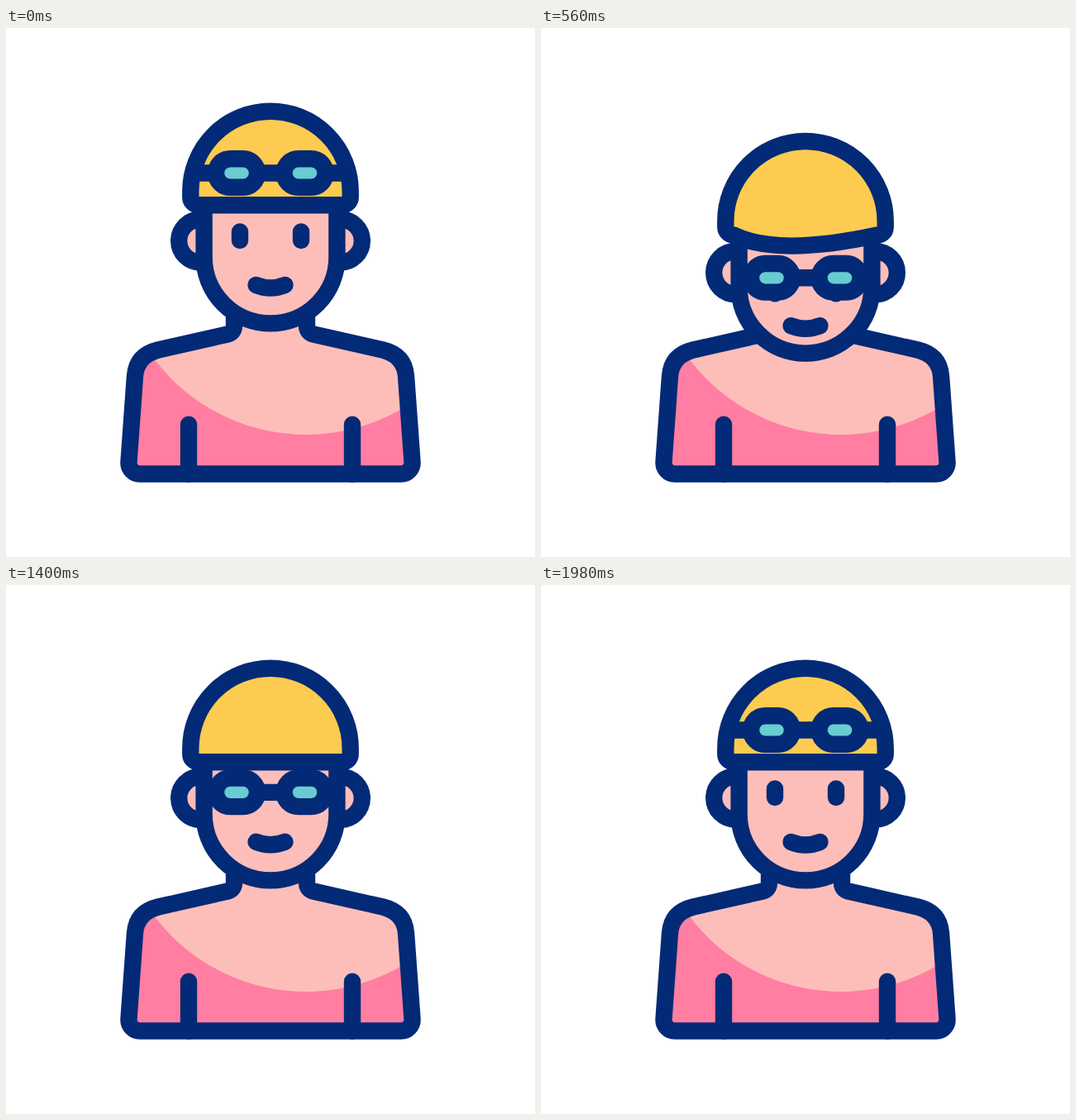
Write an HTML page that moves like this. It is 640 px wide and 640 px high and loops after 2400 ms.

```html
<!DOCTYPE html>
<html lang="en">
<head>
<meta charset="utf-8">
<title>Swimmer</title>
<style>
  html, body { margin: 0; width: 100%; height: 100%; overflow: hidden; background: #fff; }
  svg { display: block; width: 100%; height: 100%; }
  .line { stroke: #032a76; stroke-width: 20.4; stroke-linecap: round; stroke-linejoin: round; fill: none; }
  .skin { fill: #fdbeb9; }
  .shirt { fill: #ff7ea1; }
  .cap { fill: #fdcb50; }
  .lens { fill: #68ccd1; }
  .strap { stroke-linecap: butt; }
</style>
</head>
<body>
<svg viewBox="0 0 640 640">
  <defs>
    <path id="torso" d="M276 345V360Q276 368.500 268 370.500L184 389.500Q158 396 156 421L148.500 525A13.500 13.500 0 0 0 162 539.500H478A13.500 13.500 0 0 0 491.500 525L484 421Q482 396 456 389.500L372 370.500Q364 368.500 364 360V345"/>
    <clipPath id="inside"><use href="#torso"/></clipPath>
  </defs>

  <g clip-path="url(#inside)">
    <rect class="shirt" x="130" y="330" width="380" height="220"/>
    <circle class="skin" cx="363" cy="262" r="230"/>
  </g>
  <use href="#torso" class="line"/>
  <path class="line" d="M221 479.700V539.700M419 479.700V539.700"/>

  <g id="head">
    <circle id="earL" class="line skin" cx="235.200" cy="257.500" r="26"/>
    <circle id="earR" class="line skin" cx="404.800" cy="257.500" r="26"/>
    <path class="line skin" d="M239.600 206V277A80.400 80.400 0 0 0 400.400 277V206"/>
    <path id="eyes" class="line" d="M283 246.500V257M357 246.500V257"/>
    <path id="mouth" class="line" d="M302.500 311Q320 318 337.500 311"/>
    <path id="cap" class="line cap"/>
    <g id="goggles">
      <path class="line strap" d="M231 0H254M304 0H336M386 0H409"/>
      <rect class="line lens" x="254" y="-17.300" width="50" height="34.600" rx="17.300"/>
      <rect class="line lens" x="336.500" y="-17.300" width="50" height="34.600" rx="17.300"/>
    </g>
  </g>
</svg>
<script>
const LOOP = 2400;
const $ = id => document.getElementById(id);

// Key times: rest, look up, nod down, rest, hold, look up, rest
const FACE = [0, 350, 620, 940, 1380, 1650, 1980];
const NOD = [0, 380, 620, 940];
const GOGGLES = [175.5, 155, 280.3, 252.3, 252.3, 155, 175.5];

const ease = k => (1 - Math.cos(Math.PI * k)) / 2;

function track(times, values, t) {
  const i = times.findIndex(x => x > t);
  if (i < 0) return values[values.length - 1];
  const k = (t - times[i - 1]) / (times[i] - times[i - 1]);
  return values[i - 1] + (values[i] - values[i - 1]) * ease(k);
}

const tilt = (up, down, t) => track(FACE, [0, up, down, 0, 0, up, 0], t);

const shift = (id, y) => $(id).setAttribute('transform', `translate(0 ${y.toFixed(3)})`);

function capPath(bend, lean) {
  return 'M223.3 204.8V197.5A96.7 96.7 0 0 1 416.7 197.5V204.8A9.6 9.6 0 0 1 407 214.3' +
    `Q${320 + lean} ${214.3 + 2 * bend} 233 214.3A9.6 9.6 0 0 1 223.3 204.8Z`;
}

function draw(t) {
  shift('head', track(NOD, [0, 0, 42.2, 0], t));
  shift('earL', tilt(20.5, 0, t));
  shift('earR', tilt(22, 0, t));
  shift('eyes', tilt(-18, 34, t));
  shift('mouth', tilt(-22, 17.5, t));
  shift('goggles', track(FACE, GOGGLES, t));
  $('cap').setAttribute('d', capPath(tilt(-7.3, 15.6, t), tilt(0, -38, t)));
}

function tick() {
  draw(performance.now() % LOOP);
  requestAnimationFrame(tick);
}
tick();
</script>
</body>
</html>
```
